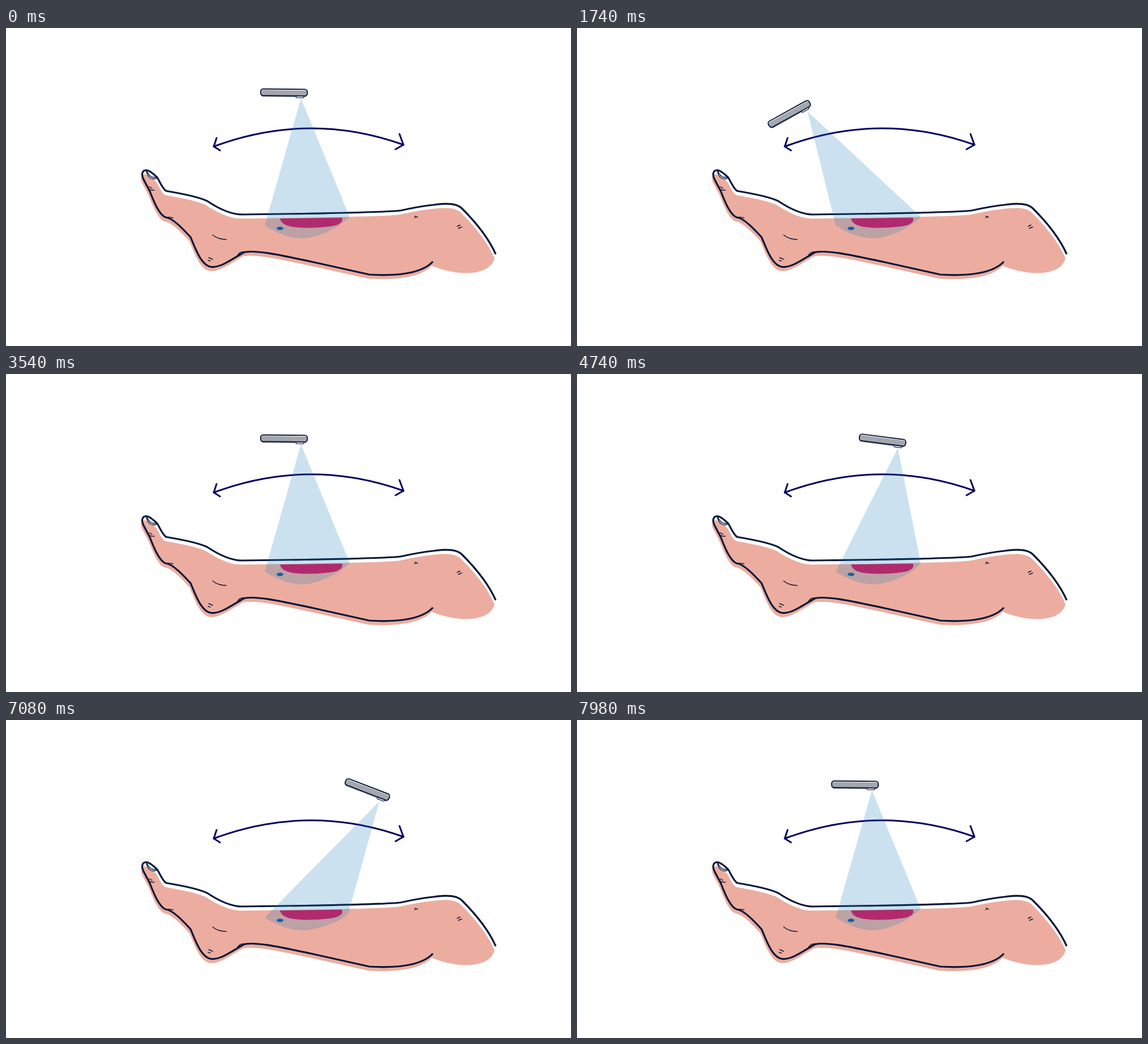
Write an HTML page that moves like this. It is 998 px wide and 561 px high and loops after 9.6 s.

```html
<!DOCTYPE html>
<html lang="en">
<head>
<meta charset="utf-8">
<title>Leg scan</title>
<style>
  html, body { margin: 0; width: 100%; height: 100%; overflow: hidden; background: #fff; }
  svg { display: block; width: 100vw; height: 100vh; }
  .line { fill: none; stroke: #04173a; stroke-width: 3.2; stroke-linejoin: round; }
  .thin { fill: none; stroke: #04173a; stroke-width: 1.4; stroke-linecap: round; stroke-linejoin: round; }
  .arrow { fill: none; stroke: #05005f; stroke-width: 3; stroke-linecap: round; stroke-linejoin: round; }
</style>
</head>
<body>
<svg viewBox="0 0 998 561">
  <path id="skin" fill="#ecada0" transform="translate(-2 7.3)"/>
  <path fill="#fff" d="M247 252C249 262 256 269 267 265C262 258 254 251 247 252Z"/>
  <path id="outline" class="line"/>
  <g class="thin">
    <path d="M248 253C250 263 257 269 266 265M249 253C253 262 259 266 267 262"/>
    <path d="M253 280L258 283M254 285Q258 287 262 286"/>
    <path d="M281 334Q288 333 295 335"/>
    <path d="M365 365C372 371 380 373 389 373"/>
    <path d="M358 405L365 408M357 410L361 411"/>
    <path d="M408 403C411 396 416 394 425 395"/>
    <path d="M722 335L723 332L727 334"/>
    <path d="M797 350L802 347.5M799 353.5L805 351"/>
  </g>
  <g class="arrow">
    <path d="M367 209Q535 146.5 702 206"/>
    <path d="M372 194L367 209L378 216M695 187L702 206L688 214"/>
  </g>
  <path id="beam" fill="rgb(19,119,182)" fill-opacity=".22"/>
  <path fill="#b02a6d" d="M484 336L593 334.5C596 339 593 345 581 348.5C563 352 545 352.5 528 352.5C503 352 486 348 484 336Z"/>
  <ellipse cx="484" cy="353.5" rx="6" ry="3" fill="#1161a5"/>
  <g id="phone">
    <rect x="-41" y="-4" width="82" height="12" rx="4.5" fill="#a4a7ae"/>
    <rect x="21.5" y="5" width="13.5" height="4" rx="1" fill="#fff" stroke="#04173a" stroke-width="1.2"/>
    <rect x="-40" y="-4" width="80" height="9" rx="3" fill="#a4a7ae"/>
    <rect x="-41.2" y="-6" width="82.4" height="11.8" rx="4.5" fill="none" stroke="#04173a" stroke-width="1.9"/>
  </g>
</svg>
<script>
const $ = id => document.getElementById(id);
const LOOP = 9600, TICK = 60;

const leg = "M865 399C850 365 825 338 806 319C797 309 775 309 755 312C735 314 715 318 697 322" +
  "C670 325 600 326 530 327.5L417 329C395 329 370 315 355 305C340 298 310 292 283 287.5" +
  "C277 284 272 272 268 265C262 258 252 250 246 251C240 252 239 260 243 267" +
  "C247 275 251 282 254 288C260 303 270 330 282 334C295 335 315 357 326 369" +
  "C335 390 345 420 363 421.5C380 423 400 407 421 395.5C445 391 490 402 543 413" +
  "L642 435C690 438 735 433 754 412";
$("outline").setAttribute("d", leg);
$("skin").setAttribute("d", leg + "C790 428 855 435 865 399Z");

// phone x, y, angle; beam tip x, y; bulge of the beam's right corner
const mid = [491, 113.8, 0.5, 521, 124, 0];
const left = [375, 151.7, -29, 407, 147, 0];
const right = [638.3, 122.7, 21, 659.5, 143.5, 1];
const drift = p => p.map((v, i) => i === 0 || i === 3 ? v - 1.2 : v);

const linear = p => p;
const soft = p => p - 0.022 * Math.sin(2 * Math.PI * p);

// start, end, from, to, easing
const moves = [
  [0, 900, mid, drift(left), linear],
  [900, 1740, drift(left), left, linear],
  [2640, 3540, left, mid, soft],
  [4440, 5340, mid, drift(right), linear],
  [5340, 6240, drift(right), right, linear],
  [7080, 7980, right, mid, soft]
];

function poseAt(t) {
  let pose = mid;
  for (const [start, end, from, to, ease] of moves) {
    if (t < start) break;
    const p = ease(Math.min(1, (t - start) / (end - start)));
    pose = from.map((v, i) => v + (to[i] - v) * p);
  }
  return pose;
}

function draw(t) {
  const [x, y, angle, tipX, tipY, bulge] = poseAt(t);
  $("phone").setAttribute("transform", `translate(${x} ${y}) rotate(${angle})`);
  $("beam").setAttribute("d", `M${tipX} ${tipY}L607 333C${590 + 18 * bulge} 352 550 371 524 371` +
    "C498 371 475 360 457 348.5Z");
}

const begin = performance.now();
function tick() {
  const t = (performance.now() - begin) % LOOP;
  draw(Math.floor(t / TICK) * TICK);
  requestAnimationFrame(tick);
}
tick();
</script>
</body>
</html>
```
